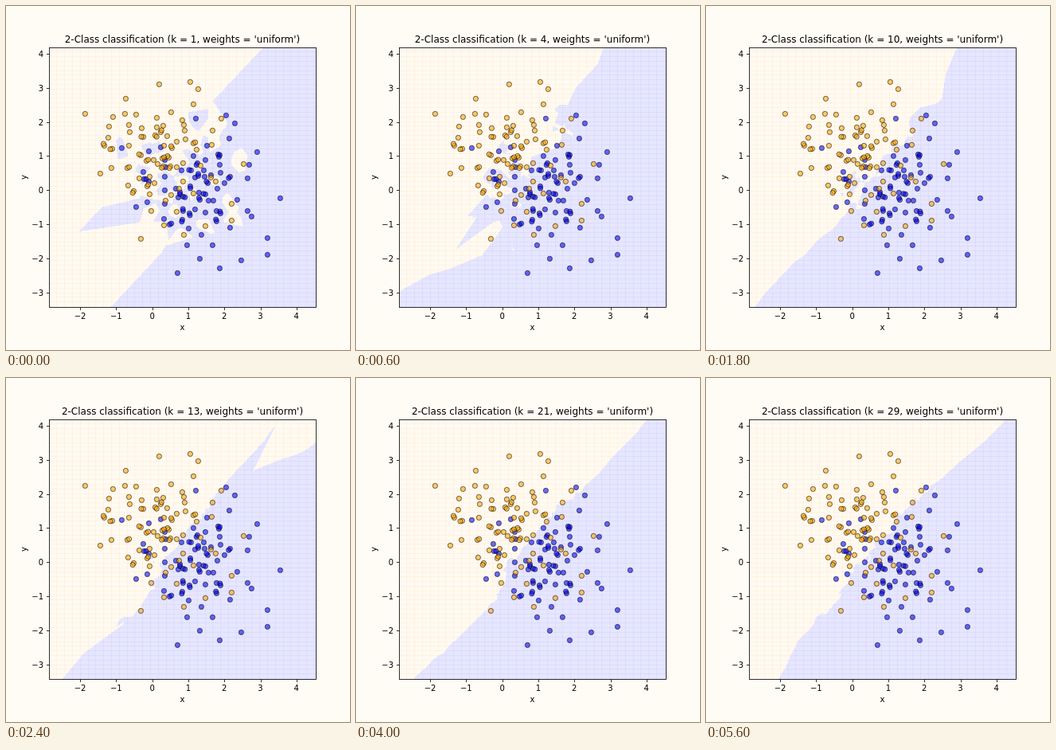
Write an HTML page with a canvas that moves like this. It is 432 by 432 pixels and loops after 5.8 s.

```html
<!DOCTYPE html>
<html>
<head>
<meta charset="utf-8">
<style>
html, body { margin: 0; width: 100%; height: 100%; overflow: hidden; background: #fffbf5; }
canvas { display: block; }
</style>
</head>
<body>
<canvas id="stage" width="432" height="432"></canvas>
<script>
const ctx = document.getElementById('stage').getContext('2d');
const LEFT = 54, TOP = 52, W = 336, H = 327, STEPS = 29, STEP_MS = 200;

// Sample positions on the stage as x, y pairs; dense spots come last.
const orange = [
  99,135, 192,98, 231,95, 241,104, 150,116, 235,123, 149,135, 163,136, 134,139, 207,133,
  129,151, 154,149, 155,158, 128,165, 118,210, 154,175, 132,203, 189,140, 221,143, 223,149,
  224,156, 270,141, 259,156, 258,174, 197,150, 189,152, 170,153, 202,163, 214,170, 225,167,
  239,180, 198,175, 185,193, 190,198, 214,202, 222,197, 244,200, 298,198, 180,214, 180,236,
  153,225, 182,257, 169,292, 198,275, 200,244, 207,237, 214,258, 223,287, 250,276, 283,248,
  283,269, 235,235, 257,215, 263,220, 222,220, 217,229, 167,216, 186,222,
  123,175, 133,179, 152,203, 194,158, 187,162, 172,164, 235,172, 208,178, 204,190, 169,187,
  176,194, 196,191, 197,201, 206,201, 177,226, 160,232];
const blue = [
  145,178, 194,177, 179,182, 172,208, 163,252, 177,246, 238,141, 276,137, 287,147, 280,166,
  252,175, 315,183, 305,199, 303,216, 344,241, 266,186, 268,199, 269,209, 274,222, 290,243,
  303,257, 308,264, 328,291, 328,312, 295,319, 268,329, 243,317, 215,335, 227,300, 259,300,
  281,278, 245,287, 198,267, 199,248, 199,231, 199,214, 199,193, 229,279, 216,240, 213,229,
  220,206, 235,188, 250,193, 248,206, 257,212, 249,214, 237,215, 242,234, 265,229, 254,244,
  260,244, 264,257, 250,259, 237,255, 179,220, 200,202,
  173,217, 205,274, 221,268, 230,260, 222,257, 232,206, 240,197, 241,213, 218,236, 250,236,
  243,243, 253,222, 267,189, 231,226, 281,214, 269,260, 264,270, 222,239];

let seed = 7;
const random = () => (seed = (seed * 16807) % 2147483647) / 2147483647;

// Turns pairs into points and gives each of the last `dense` ones a close neighbour.
function samples(list, isBlue, dense) {
  const pts = [];
  for (let i = 0; i < list.length; i += 2) pts.push({ x: list[i], y: list[i + 1], isBlue });
  for (const p of pts.slice(-dense)) {
    const a = random() * 2 * Math.PI;
    pts.push({ x: p.x + 2.5 * Math.cos(a), y: p.y + 2.5 * Math.sin(a), isBlue });
  }
  return pts;
}
const points = [...samples(blue, 1, 18), ...samples(orange, 0, 16)];

// For each pixel, bit k - 1 tells whether blue wins the vote of the k nearest samples.
function countVotes() {
  const n = points.length, votes = new Uint32Array(W * H);
  const xs = Float64Array.from(points, p => p.x), ys = Float64Array.from(points, p => p.y);
  const dist = new Float64Array(n), order = Uint8Array.from(points, (_, i) => i);
  for (let i = 0; i < W * H; i++) {
    const x = LEFT + i % W + 0.5, y = TOP + Math.floor(i / W) + 0.5;
    for (let j = 0; j < n; j++) dist[j] = (xs[j] - x) ** 2 + (ys[j] - y) ** 2;
    // The order hardly changes between pixels, so insertion sort is quick.
    for (let j = 1; j < n; j++) {
      const id = order[j], d = dist[id];
      let m = j;
      while (m > 0 && dist[order[m - 1]] > d) order[m] = order[--m];
      order[m] = id;
    }
    let wins = 0, bits = 0;
    for (let k = 1; k <= STEPS; k++) {
      wins += points[order[k - 1]].isBlue;
      if (wins * 2 >= k) bits |= 1 << (k - 1);
    }
    votes[i] = bits;
  }
  return votes;
}
const votes = countVotes();
const image = ctx.createImageData(W, H);

// Mesh cells are a little smaller than pixels; doubled cells show as darker lines.
const doubled = (i, rate) => Math.floor((i + 1) * rate) - Math.floor(i * rate) - 1;

function drawRegions(k) {
  for (let i = 0; i < W * H; i++) {
    const lines = doubled(i % W, 1.102) + doubled(Math.floor(i / W), 1.172);
    const isBlue = votes[i] >> (k - 1) & 1, o = i * 4;
    image.data[o] = isBlue ? 230 - 9 * lines : 255;
    image.data[o + 1] = isBlue ? 230 - 9 * lines : 250 - 7 * lines;
    image.data[o + 2] = isBlue ? 255 - lines : 242 - 17 * lines;
    image.data[o + 3] = 255;
  }
  ctx.putImageData(image, LEFT, TOP);
}

function drawPoints() {
  ctx.globalAlpha = 0.57;
  ctx.lineWidth = 1;
  for (const p of points) {
    ctx.beginPath();
    ctx.arc(p.x + 0.4, p.y + 0.4, 3.1, 0, 2 * Math.PI);
    ctx.fillStyle = p.isBlue ? 'blue' : 'orange';
    ctx.fill();
    ctx.stroke();
  }
  ctx.globalAlpha = 1;
}

function text(str, x, y, align = 'center', size = 10) {
  ctx.font = size + 'px "DejaVu Sans", sans-serif';
  ctx.textAlign = align;
  ctx.fillText(str, x, y);
}

function line(x, y, dx, dy) {
  ctx.beginPath();
  ctx.moveTo(x, y);
  ctx.lineTo(x + dx, y + dy);
  ctx.stroke();
}

function drawAxes() {
  const label = v => String(v).replace('-', '\u2212');
  ctx.fillStyle = ctx.strokeStyle = '#000';
  ctx.lineWidth = 0.8;
  ctx.strokeRect(54.5, 52.5, 335, 326);
  for (let v = -3; v <= 4; v++) {
    const x = 183.6 + 45.3 * v, y = 231.2 - 42.8 * v;
    line(54.5, Math.round(y) + 0.5, -3.5, 0);
    text(label(v), 47, Math.round(y) + 4, 'right');
    if (v < -2) continue;
    line(Math.round(x) + 0.5, 378.5, 0, 3.5);
    text(label(v), x, 393);
  }
  text('x', 221.5, 407);
  ctx.save();
  ctx.translate(26, 215);
  ctx.rotate(-Math.PI / 2);
  text('y', 0, 0);
  ctx.restore();
}

let shown = 0;
function frame() {
  const k = 1 + Math.floor(performance.now() / STEP_MS) % STEPS;
  if (k !== shown) {
    shown = k;
    ctx.fillStyle = '#fffbf5';
    ctx.fillRect(0, 0, 432, 432);
    drawRegions(k);
    drawPoints();
    drawAxes();
    text(`2-Class classification (k = ${k}, weights = 'uniform')`, 221.5, 46, 'center', 12);
  }
  requestAnimationFrame(frame);
}
frame();
</script>
</body>
</html>
```
